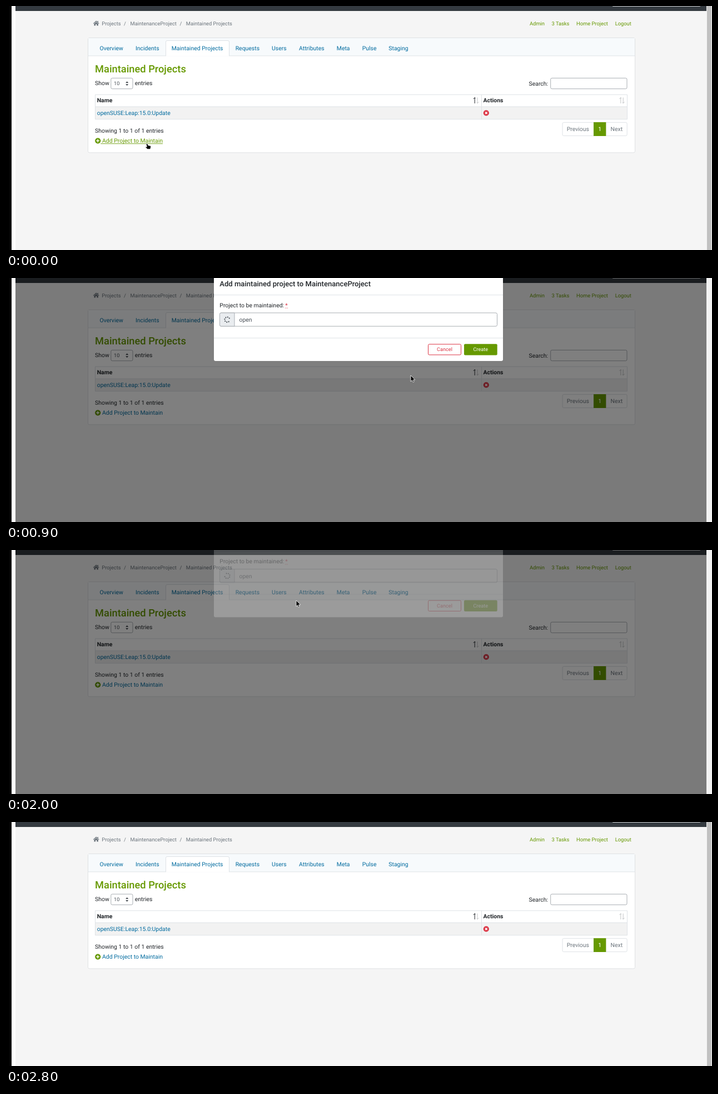
Write an HTML page that moves like this. It is 1270 px wide and 441 px high and loops after 2900 ms.

```html
<!DOCTYPE html>
<html lang="en">
<head>
<meta charset="utf-8">
<title>Maintained projects</title>
<style>
html, body { margin: 0; width: 100%; height: 100%; overflow: hidden; background: #fff; }
svg { display: block; width: 1270px; height: 441px; font: 10.45px Roboto, sans-serif; text-rendering: geometricPrecision; }
text { fill: #212529; }
.small text { font-size: 9.35px; fill: #6c757d; }
.green text, text.green { fill: #690; }
.link text, text.link { fill: #006b9f; }
.btn text { font-size: 9.15px; text-anchor: middle; }
.pager text { text-anchor: middle; fill: #6c757d; }
.bold { font-weight: 700; }
.heading { font-size: 18.28px; font-weight: 500; }
.title { font-size: 13.07px; font-weight: 500; }
.line { fill: none; stroke: #dee2e6; }
.field { fill: #fff; stroke: #a9aeb3; }
svg .white { fill: #fff; }
svg .red { fill: #dc3545; }
</style>
</head>
<body>
<svg viewBox="0 0 1270 441">
  <defs>
    <g id="sort" fill="none">
      <path d="M0 176V165.5M-2.4 168L0 165.5L1.2 167" />
    </g>
  </defs>

  <!-- window -->
  <rect width="10" height="441"/>
  <rect x="17" width="1243" height="441" fill="#f5f5f5"/>
  <rect x="17" width="1243" height="9" fill="#343a40"/>
  <rect x="1090" y="-12" width="160" height="12.8" rx="2.5" fill="#fff"/>
  <rect x="1260" width="10" height="441" fill="#f2f2f2"/>
  <rect id="scrollbar" x="1261" width="8" height="441" fill="#c1c1c1"/>

  <g class="small">
    <path d="M156.8 31.4L162.2 26.6L167.6 31.4L166.8 32.2L162.2 28.2L157.6 32.2ZM158.5 32.2L162.2 29L165.9 32.2V35.6H163.3V32.8H161.1V35.6H158.5ZM164.6 27H166V29.5L164.6 28.3Z" fill="#6c757d"/>
    <text x="172.3" y="34.5">Projects</text>
    <text x="212" y="34.5">/</text>
    <text x="223.5" y="34.5">MaintenanceProject</text>
    <text x="312.5" y="34.5">/</text>
    <text x="323.8" y="34.5">Maintained Projects</text>
    <g class="green">
      <text x="942" y="34.5">Admin</text>
      <text x="981.5" y="34.5">3 Tasks</text>
      <text x="1026" y="34.5">Home Project</text>
      <text x="1095.7" y="34.5">Logout</text>
    </g>
  </g>

  <!-- card -->
  <rect x="147.5" y="57.5" width="984" height="207.5" rx="2.5" fill="#fff" stroke="#dfe1e3"/>
  <path d="M148 90V58H1131V90Z" fill="#f7fafc"/>
  <path d="M148 90H1131" class="line"/>
  <path d="M287.5 90V65Q287.5 62.5 290 62.5H399Q401.5 62.5 401.5 65V90" fill="#fff" stroke="#dee2e6"/>
  <path d="M288 90H401" stroke="#fff" stroke-width="1.6"/>
  <g class="link">
    <text x="168.5" y="79.8">Overview</text>
    <text x="233" y="79.8">Incidents</text>
    <text x="297.7" y="79.8">Maintained Projects</text>
    <text x="412.7" y="79.8">Requests</text>
    <text x="478" y="79.8">Users</text>
    <text x="527" y="79.8">Attributes</text>
    <text x="594.8" y="79.8">Meta</text>
    <text x="640.7" y="79.8">Pulse</text>
    <text x="688.3" y="79.8">Staging</text>
  </g>

  <text class="heading green" x="160" y="120.3">Maintained Projects</text>
  <text x="160" y="143.3">Show</text>
  <rect class="field" x="188.8" y="130.3" width="39.2" height="19.4" rx="2.5"/>
  <text x="194" y="143.3" style="font-size:9.15px;fill:#495057">10</text>
  <path d="M215.2 139L217.7 136.2L220.2 139ZM215.2 141.2L217.7 144L220.2 141.2Z" fill="#343a40"/>
  <text x="231.7" y="143.3">entries</text>
  <text x="940.5" y="143.5">Search:</text>
  <rect class="field" x="979.7" y="130.3" width="137.3" height="19.4" rx="2.5"/>

  <!-- table -->
  <rect x="160" y="182" width="958" height="22.5" fill="#f2f2f2"/>
  <path class="line" d="M160.5 160.2H1117.5V204.7H160.5ZM160.5 182H1117.5M855.5 160V204.5"/>
  <text class="bold" x="163.7" y="174.3">Name</text>
  <text class="bold" x="858.5" y="174.3">Actions</text>
  <use href="#sort" x="843.2" stroke="#212529"/>
  <use href="#sort" transform="rotate(180 424 170.7)" stroke="#c3c5c7"/>
  <use href="#sort" x="1105.8" stroke="#c3c5c7"/>
  <use href="#sort" transform="rotate(180 555.1 170.7)" stroke="#c3c5c7"/>
  <text class="link" x="163.7" y="197.1">openSUSE:Leap:15.0:Update</text>
  <circle class="red" cx="863.8" cy="193.3" r="5.1"/>
  <path d="M862 191.5L865.6 195.1M865.6 191.5L862 195.1" stroke="#fff" stroke-width="1.5"/>
  <text x="160" y="229.2">Showing 1 to 1 of 1 entries</text>

  <g class="pager">
    <rect class="line" x="1001" y="210.4" width="116.2" height="24.2" rx="2.5"/>
    <path class="line" d="M1079 210.4V234.6"/>
    <rect x="1057" y="210" width="22.3" height="25" fill="#690"/>
    <text x="1028.8" y="226.1">Previous</text>
    <text class="white" x="1068.2" y="226.1">1</text>
    <text x="1098.3" y="226.1">Next</text>
  </g>

  <circle cx="165.2" cy="243.6" r="5.1" fill="#690"/>
  <path d="M162.3 243.6H168.1M165.2 240.7V246.5" stroke="#fff" stroke-width="1.5"/>
  <text id="add" class="link" x="173" y="247.4">Add Project to Maintain</text>
  <path id="underline" d="M170.3 248.8H282" stroke="#690" stroke-width=".9"/>

  <rect id="backdrop" x="17" width="1243" height="441"/>

  <!-- dialog -->
  <g id="modal">
    <rect x="374" y="-60" width="520" height="210" rx="3" fill="#fff"/>
    <path class="line" d="M374 30.7H894M374 108.5H894"/>
    <text class="title" x="384.3" y="14.9">Add maintained project to MaintenanceProject</text>
    <text x="384.3" y="52.8">Project to be maintained:</text>
    <text class="red" x="502.2" y="52.8">*</text>
    <path d="M502 54.3H507" stroke="#dc3545" stroke-width=".8" stroke-dasharray="1"/>
    <rect class="field" x="384.5" y="63" width="499" height="24.2" rx="2.5"/>
    <path d="M411 63H387Q384.5 63 384.5 65.5V84.7Q384.5 87.2 387 87.2H411Z" fill="#e9ecef" stroke="#a9aeb3"/>
    <g id="spinner" fill="#495057"></g>
    <text x="419.5" y="79" style="fill:#495057">open</text>
    <g class="btn">
      <rect id="cancel" x="759.5" y="119.7" width="59" height="19.2" rx="2" stroke="#dc3545"/>
      <text id="cancelText" x="789" y="132.4">Cancel</text>
      <rect x="824" y="119.2" width="59.7" height="20.2" rx="2" fill="#690"/>
      <text class="white" x="853.8" y="132.4">Create</text>
    </g>
  </g>

  <g stroke="#fff" stroke-width=".8" stroke-linejoin="round">
    <path id="hand" d="M252.2 249.2Q253.4 247.8 254.6 249.2L255.6 251.8L259.6 252.6Q260.8 253.2 260.4 255.2L259.6 258.8H254.4L251.2 255.6Q250.6 254 252.2 254.2L253.4 254.8Z"/>
    <path id="arrow" d="M0 0V11L2.5 8.8L4.2 12.4L6 11.6L4.4 8H7.8Z"/>
  </g>
</svg>
<script>
const LOOP = 2900, STEP = 100;
const el = id => document.getElementById(id);
const clamp = v => Math.min(1, Math.max(0, v));
const easeOut = p => 1 - (1 - clamp(p)) ** 1.7;
const show = (id, on) => el(id).setAttribute('visibility', on ? 'visible' : 'hidden');

// pointer path: time, x, y
const path = [
  [400, 254, 249], [500, 254, 249], [900, 728, 176], [1000, 728, 176], [1400, 798, 126],
  [1800, 798, 126], [1900, 740, 118], [2100, 304, 64], [2200, 240, 46], [2400, 90, 4], [2800, 90, 4]
];

function pointer(t) {
  const i = Math.max(1, path.findIndex(p => p[0] >= t));
  const [a, b] = [path[i - 1], path[i]];
  const p = clamp((t - a[0]) / (b[0] - a[0]));
  return [1, 2].map(k => a[k] + (b[k] - a[k]) * p);
}

// seven dots on a ring, with a gap at the upper right
for (let i = 0; i < 7; i++) {
  const a = i * Math.PI / 4;
  el('spinner').innerHTML += `<circle cx="${4.6 * Math.cos(a)}" cy="${4.6 * Math.sin(a)}" r="1.1"/>`;
}

function draw(t) {
  const linkHover = t < 400;
  show('hand', linkHover);
  show('underline', linkHover);
  el('add').setAttribute('class', linkHover ? 'green' : 'link');
  show('scrollbar', linkHover || t >= 2200);

  // the backdrop fades first on opening and last on closing
  el('backdrop').setAttribute('opacity', .5 * (clamp((t - 400) / 150) - clamp((t - 2033) / 150)));
  const opening = t - 550, closing = t - 1883;
  const lift = 50 * (1 - easeOut(opening / 300) + easeOut(closing / 300));
  el('modal').setAttribute('opacity', clamp(opening / 150) - clamp(closing / 150));
  el('modal').setAttribute('transform', `translate(0 ${-lift})`);
  el('spinner').setAttribute('transform', `translate(398 75.2) rotate(${55 + (t - 900) * .18})`);

  const [x, y] = pointer(Math.min(t, 2800));
  show('arrow', !linkHover && t < 2800);
  el('arrow').setAttribute('transform', `translate(${x} ${y})`);
  const cancelHover = x > 759 && x < 819 && y > 119 && y < 140;
  el('cancel').setAttribute('fill', cancelHover ? '#dc3545' : '#fff');
  el('cancelText').setAttribute('class', cancelHover ? 'white' : 'red');
}

const start = performance.now();
function tick() {
  const t = (performance.now() - start) % LOOP;
  draw(Math.floor(t / STEP) * STEP);
  requestAnimationFrame(tick);
}
tick();
</script>
</body>
</html>
```
